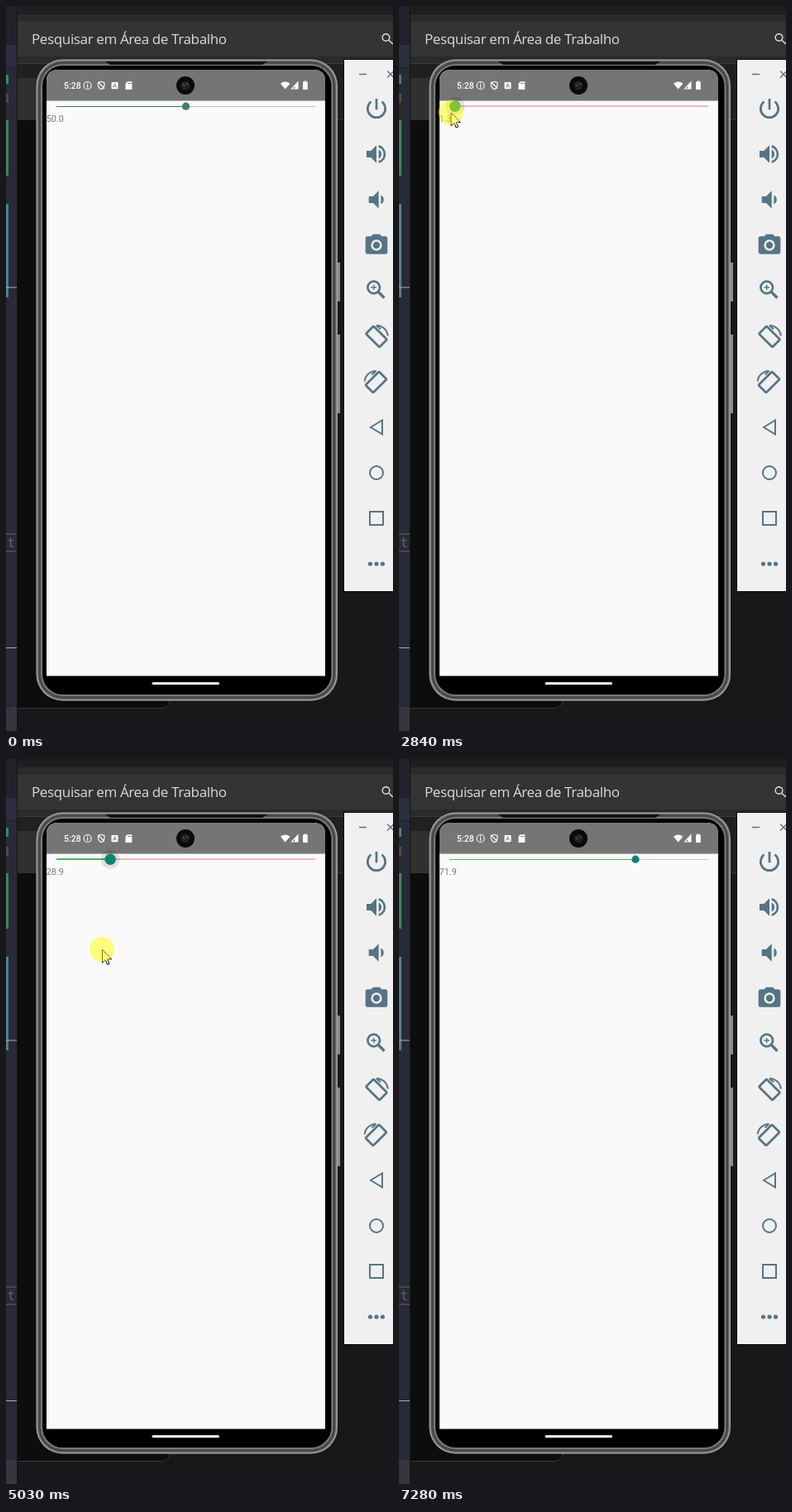
Write an HTML page that moves like this. It is 468 px wide and 876 px high and loops after 8.36 s.

```html
<!DOCTYPE html>
<html lang="pt">
<head>
<meta charset="utf-8">
<title>Slider demo</title>
<style>
  html, body { margin: 0; width: 100%; height: 100%; overflow: hidden; background: #17181a; }
  svg { display: block; width: 468px; height: 876px; }
  .title { font: 17px "Open Sans", "Noto Sans", sans-serif; letter-spacing: -.37px; fill: #dcdcdc; }
  .clock { font: 500 10.5px Roboto, sans-serif; fill: #fff; }
  .value { font: 10.7px Roboto, sans-serif; fill: #777; }
  .code { font: 16px "DejaVu Sans Mono", monospace; fill: #62646c; }
  .solid { fill: #567485; }
  .line { fill: none; stroke: #567485; stroke-width: 2; }
  .bold { stroke-width: 2.7; }
  .thin { stroke-width: 1.4; }
  .white { fill: none; stroke: #fff; stroke-width: 1.1; }
</style>
</head>
<body>
<svg viewBox="0 0 468 876">
  <defs>
    <clipPath id="screen"><path d="M49 809.5V91Q49 77 63 77H372Q386 77 386 91V809.5Z"/></clipPath>
    <g id="speaker">
      <path class="solid" d="M-12-4V4H-6.7L0 10.7V-10.7L-6.7-4ZM2.7-5.4A6 6 0 0 1 2.7 5.4Z"/>
    </g>
    <g id="tilt" class="line">
      <rect class="bold" x="-11.5" y="-6.5" width="23" height="13" rx="1" transform="rotate(45)"/>
      <path d="M0-13.6A14 14 0 0 1 13.8-1M0-13.6 5-9"/>
    </g>
  </defs>

  <!-- desktop windows -->
  <rect width="468" height="876" fill="#17181a"/>
  <rect x="13" width="455" height="10" fill="#1e1e1e"/>
  <rect x="13" y="10" width="455" height="60" fill="#2a2a2a"/>
  <rect x="13" y="19" width="455" height="42" fill="#343434"/>
  <rect x="13" y="69" width="455" height="1" fill="#3a3a3a"/>
  <rect x="13" y="70" width="455" height="68" fill="#202020"/>
  <rect x="13" y="87" width="37" height="51" fill="#303030"/>
  <path d="M400 137.5H468" stroke="#333"/>
  <path d="M13 138H198V839Q198 849 188 849H13Z" fill="#0d0d0d"/>
  <path d="M13 848.5H187Q198 848.5 198 838" fill="none" stroke="#393a3c"/>
  <text class="title" x="31" y="46">Pesquisar em Área de Trabalho</text>
  <g fill="none" stroke="#e4e4e4" stroke-width="1.4"><circle cx="459.5" cy="38" r="4.3"/><path d="M462.7 41.2 468 46"/></g>

  <!-- editor strip -->
  <rect width="13" height="876" fill="#282a36"/>
  <rect width="13" height="47" fill="#21222c"/>
  <rect y="47" width="13" height="26" fill="#2c2e40"/>
  <rect y="847" width="13" height="29" fill="#35363f"/>
  <path d="M0 74.5H13" stroke="#20212a"/>
  <path d="M13.5 0V876" stroke="#111216"/>
  <path d="M0 83H3V94H0ZM0 138H3V205H0Z" fill="#428460"/>
  <rect y="106" width="3" height="11" fill="#4b4b49"/>
  <rect y="239" width="3" height="113" fill="#4e8194"/>
  <path d="M0 340H13M0 775.5H13" stroke="#aaacb2"/>
  <path d="M0 638H13M0 659H13" stroke="#50525a" stroke-width="1.5"/>
  <text class="code" x="1.5" y="654">t</text>

  <!-- phone -->
  <path d="M400 310H404V357H400ZM400 397H404V492H400Z" fill="#8b8b8b"/>
  <g id="rim"></g>
  <path d="M120 67H316L310 71H126Z" fill="#111"/>
  <g clip-path="url(#screen)">
    <rect x="49" y="77" width="337" height="733" fill="#fafafa"/>
    <rect x="49" y="77" width="337" height="37.5" fill="#757575"/>
  </g>
  <rect x="176.5" y="817" width="81.5" height="3" rx="1.5" fill="#f4f4f4"/>
  <circle cx="217" cy="96" r="11" fill="#0a0a0a"/>
  <circle cx="217" cy="96" r="5.5" fill="#202020"/>
  <path d="M214 94.5 216 97M218 93.5 220 95" stroke="#777"/>

  <!-- status bar -->
  <text class="clock" x="70" y="99.6">5:28</text>
  <g class="white">
    <circle cx="98.6" cy="96" r="4.5"/>
    <path d="M98.6 95V98.8M98.6 93V94.2"/>
    <path d="M115.2 91.3 119 92.7V95.8Q118.6 99.3 115.2 100.8 111.8 99.3 111.4 95.8V92.7ZM111.5 92 119 99.5"/>
    <path d="M345.5 100H353V92Z"/>
  </g>
  <g fill="#fff">
    <rect x="127.5" y="92" width="8" height="8.2" rx=".8"/>
    <path d="M146.8 91.2H152.3V101H144.5V93.6Z"/>
    <path d="M332 93.7Q337.7 89.2 343.4 93.7L337.7 100.6Z"/>
    <path d="M349.3 96 353 92V100H349.3Z"/>
    <path d="M359 91.6H360.6V90.4H363.2V91.6H364.8V101H359Z"/>
  </g>
  <path d="M129.5 98.5 131.5 93.7 133.5 98.5M130.3 97H132.7M147 93.5H151.5" fill="none" stroke="#757575" stroke-width=".9"/>

  <!-- emulator tools -->
  <rect x="408.5" y="64.5" width="70" height="643" fill="#f0f0f0" stroke="#060606"/>
  <path class="line thin" d="M427 82.5H436M461 78.5 469 86.5M469 78.5 461 86.5"/>
  <path class="line bold" d="M448 112V125.3M441.5 115.5A10.7 10.7 0 1 0 454.5 115.5"/>
  <use href="#speaker" x="448" y="179"/>
  <path class="line bold" d="M450.7 169.4A10 10 0 0 1 450.7 188.6"/>
  <use href="#speaker" x="450.7" y="234"/>
  <path class="solid" d="M444 275.7 441.6 278.3H437.3Q434.7 278.3 434.7 281V297Q434.7 299.7 437.3 299.7H458.7Q461.3 299.7 461.3 297V281Q461.3 278.3 458.7 278.3H454.4L452 275.7Z"/>
  <circle cx="448" cy="289" r="5.4" fill="none" stroke="#f0f0f0" stroke-width="2.5"/>
  <g class="line">
    <circle class="bold" cx="444.7" cy="340" r="7.3"/>
    <path d="M450 345.3 457.5 352.8" stroke-width="3.4"/>
    <path class="thin" d="M441.3 340H448M444.7 336.7V343.3"/>
    <path d="M441 509 455 500.5V517.5Z"/>
    <circle cx="448" cy="564" r="8"/>
    <rect x="440" y="611" width="16" height="16"/>
    <path d="M440.5 674H456" stroke-width="5.2" stroke-linecap="round" stroke-dasharray="0 7.5"/>
  </g>
  <use href="#tilt" x="448" y="399.5"/>
  <use href="#tilt" transform="translate(447.5 454.5) scale(-1 1)"/>

  <!-- slider -->
  <path id="rest" d="M61 0H374"/>
  <path id="fill"/>
  <circle id="halo" cy="121.2" fill="#000" fill-opacity=".1"/>
  <circle id="thumb" cy="121.2"/>
  <text id="value" class="value" x="48.8" y="139.5"></text>

  <g id="cursor">
    <path d="M.5.5V16.2L4.2 12.8 6.7 18.5 9.1 17.4 6.6 11.9H11.6Z" fill="#fff" stroke="#000"/>
    <circle id="press" r="15" fill="#ff0" fill-opacity=".5"/>
  </g>
</svg>
<script>
const LOOP = 8360, STEP = 70, LEFT = 61, RIGHT = 374;
const SHOWN = 180, PRESSED = 1960, TOUCHED = 2220, RELEASED = 7080;
const el = id => document.getElementById(id);

// Turning points of the hand; the motion eases between them.
const turns = [
  { t: 190, x: 329, y: 715, thumb: 217.5 },
  { t: 330, x: 232, y: 421, thumb: 217.5 },
  { t: 560, x: 232, y: 421, thumb: 217.5 },
  { t: 1350, x: 215, y: 123, thumb: 217.5 },
  { t: 1960, x: 215, y: 120, thumb: 217.5 },
  { t: 2090, x: 190, y: 116, thumb: 217.5 },
  { t: 2500, x: 54, y: 125, thumb: LEFT },
  { t: 3680, x: 114, y: 150, thumb: 108.6 },
  { t: 4420, x: 260, y: 190, thumb: 242 },
  { t: 4640, x: 402, y: 205, thumb: RIGHT },
  { t: 5045, x: 115, y: 230, thumb: 125.3 },
  { t: 5480, x: 27, y: 315, thumb: LEFT },
  { t: 6200, x: 416, y: 463, thumb: RIGHT },
  { t: 6720, x: 33, y: 480, thumb: LEFT },
  { t: 7060, x: 288, y: 500, thumb: 286 }
];

const clamp = v => Math.min(1, Math.max(0, v));
const ease = u => (1 - Math.cos(Math.PI * clamp(u))) / 2;

function hand(t, part) {
  const next = turns.findIndex(k => k.t > t);
  if (next < 1) return turns.at(next)[part];
  const a = turns[next - 1], b = turns[next];
  return a[part] + (b[part] - a[part]) * ease((t - a.t) / (b.t - a.t));
}

function set(id, attrs) {
  for (const k in attrs) el(id).setAttribute(k, attrs[k]);
}
const show = (id, on) => set(id, { visibility: on ? 'inherit' : 'hidden' });

function draw(time) {
  const t = Math.floor((time - 50) / STEP) * STEP + 60;
  const x = hand(t, 'thumb');
  const grip = clamp((t - 2170) / 130) * clamp((RELEASED + 180 - t) / 180);
  const touched = t > TOUCHED;

  const track = { transform: `translate(0 ${121.5 - grip / 2})`, 'stroke-width': 1 + grip };
  set('rest', { ...track, stroke: touched ? '#f0b8bc' : '#c8b9c6' });
  set('fill', { ...track, d: `M${LEFT} 0H${x}`, stroke: touched ? '#50b55a' : '#3f7355' });
  set('halo', { cx: x, r: 11.5 * grip });
  set('thumb', { cx: x, r: 4.6 + 2.1 * grip, fill: t < PRESSED ? '#3f7f5f' : '#0a8470' });

  // The label is one update behind the thumb.
  const value = (hand(t - STEP, 'thumb') - LEFT) / (RIGHT - LEFT) * 100;
  el('value').textContent = value.toFixed(1);

  show('cursor', t >= SHOWN && t < RELEASED);
  show('press', t >= PRESSED);
  set('cursor', { transform: `translate(${hand(t, 'x')} ${hand(t, 'y')})` });
}

// Metal rim: nested rounded shells.
el('rim').innerHTML = ['#a0a0a0', '#6c6c6c', '#404040', '#555', '#858585', '#000'].map((shade, i) => {
  const d = i * 1.5;
  return `<rect x="${36.5 + d}" y="${64.5 + d}" width="${364.5 - 2 * d}" height="${775 - 2 * d}" rx="${32 - d}" fill="${shade}"/>`;
}).join('');

const began = performance.now();
function tick() {
  draw((performance.now() - began) % LOOP);
  requestAnimationFrame(tick);
}
tick();
</script>
</body>
</html>
```
